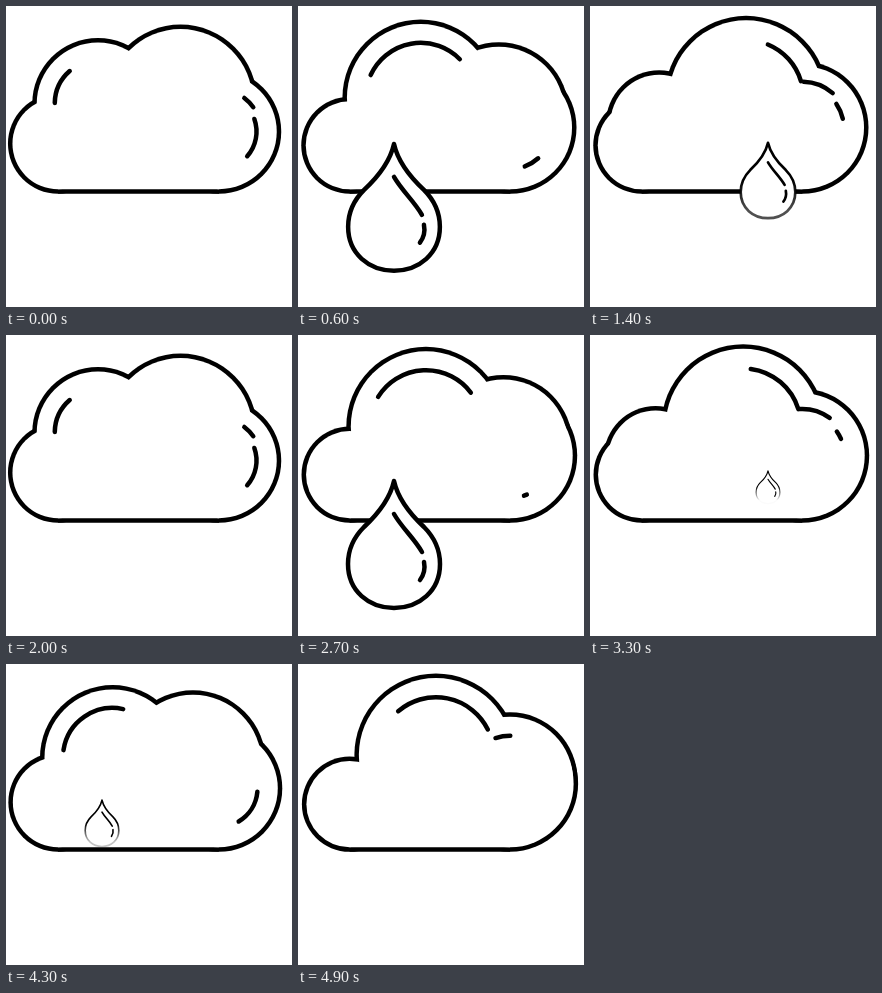
Write an HTML page that moves like this. It is 286 px wide and 301 px high and loops after 5 s.

```html
<!DOCTYPE html>
<html lang="en">
<head>
<meta charset="utf-8">
<title>Rain cloud</title>
<style>
  html, body { margin: 0; width: 100%; height: 100%; overflow: hidden; background: #fff; }
  svg { display: block; width: 100%; height: 100%; }
  .line { fill: none; stroke: #000; stroke-width: 4.5; stroke-linecap: round; stroke-linejoin: round; }
</style>
</head>
<body>
<svg viewBox="0 0 286 301">
  <defs>
    <linearGradient id="ink" x1="0" y1="0" x2="0" y2="1">
      <stop offset=".5" stop-color="#000"/>
      <stop id="fade" offset=".9" stop-color="#000"/>
    </linearGradient>
  </defs>
  <g id="edge" fill="#000"></g>
  <g id="body" fill="#fff"></g>
  <g id="shine" class="line"></g>
  <g id="drop" class="line">
    <path fill="#fff" stroke="url(#ink)" d="M0 0C-4 18-15 32-30 46C-41 57-46 70-46 83C-46 110-25 127 0 127C25 127 46 110 46 83C46 70 41 57 30 46C15 32 4 18 0 0Z"/>
    <path d="M0 33C8 47 20 57 28 71M30 81Q32 91 26 99"/>
  </g>
</svg>
<script>
const LOOP = 5000, PERIOD = 2000, STEP = 100;
const BASE = 185.5, HALF = 2.25;

const $ = id => document.getElementById(id);
const edge = $("edge"), body = $("body"), shine = $("shine"), drop = $("drop"), fade = $("fade");
const clamp = (v, lo, hi) => Math.min(hi, Math.max(lo, v));

// A bump rises out of the left end, peaks at age 1100 and sinks into the right end.
function bumpAt(age, breath) {
  const k = (age - 1100) / 2200;
  if (k < -.92 || k > .85) return null;
  const [speed, drop, endR] = k < 0 ? [98, 93, 47] : [82, 59, 64];
  const r = endR + (80 - endR) * (1 + Math.cos(Math.PI * k)) / 2;
  const x = clamp(144 + speed * k - 3 * breath, 52, 212);
  return { x, y: 11 + drop * k * k + r, r };
}

function endsAt(breath) {
  const lr = 46.6 + 1.3 * breath, rr = 63 - 3 * breath;
  return [
    { x: 5.2 - breath + lr, y: BASE - lr, r: lr },
    { x: 212.5 + .5 * breath, y: BASE - rr, r: rr }
  ];
}

const circle = ({ x, y, r }, grow) => `<circle cx="${x}" cy="${y}" r="${r + grow}"/>`;

function blob(circles, grow) {
  const [left, right] = circles;
  return circles.map(c => circle(c, grow)).join("") +
    `<rect x="${left.x}" y="130" width="${right.x - left.x}" height="${BASE + grow - 130}"/>`;
}

// A dash sliding along the inside of a circle: its head leads, its tail lags.
function dash({ x, y, r }, inset, u, from, to, lag, lead) {
  if (u <= 0 || u >= 1) return "";
  const radius = r - inset;
  const point = share => {
    const a = (from + (to - from) * share) * Math.PI / 180;
    return `${x + radius * Math.cos(a)} ${y + radius * Math.sin(a)}`;
  };
  const tail = u ** lag, head = 1 - (1 - u) ** lead;
  return `<path d="M${point(tail)}A${radius} ${radius} 0 0 1 ${point(head)}"/>`;
}

// Drops swell from the tip, then fall; left and right take turns.
function drawDrop(phase) {
  const onRight = phase >= 1000;
  const age = phase - (onRight ? 1230 : 200);
  const shown = age > 0 && age < 640;
  drop.style.display = shown ? "" : "none";
  if (!shown) return;
  const scale = Math.sin(Math.PI / 2 * Math.min(1, age / 420));
  const fall = Math.max(0, age - 400) / 100;
  const tip = 138 - 3 * (1 - scale) + 8 * fall * fall;
  drop.setAttribute("transform", `translate(${onRight ? 178 : 96} ${tip}) scale(${scale})`);
  fade.setAttribute("stop-opacity", clamp((scale - .25) / .5, 0, 1));
}

function draw(time) {
  const phase = time % PERIOD;
  const breath = Math.cos(2 * Math.PI * phase / PERIOD);
  const circles = endsAt(breath), right = circles[1];
  let marks = "";

  for (const age of [phase - PERIOD, phase, phase + PERIOD]) {
    const bump = bumpAt(age, breath);
    if (bump) {
      const u = (age + 200) / 1900;
      circles.push(bump);
      marks += dash(bump, 20 + 2.5 * u, u, 180, 344, 2.2, 3.2);
    }
    marks += dash(right, 18, (age - 750) / 1500, -110, -35, 1.5, 3);
    marks += dash(right, 22.5, (age - 1200) / 1520, -35, 71, 3, 1.7);
  }
  edge.innerHTML = blob(circles, HALF);
  body.innerHTML = blob(circles, -HALF);
  shine.innerHTML = marks;
  drawDrop(phase);
}

const start = performance.now();
function tick() {
  const t = (performance.now() - start) % LOOP;
  draw(Math.floor(t / STEP) * STEP);
  requestAnimationFrame(tick);
}
tick();
</script>
</body>
</html>
```
